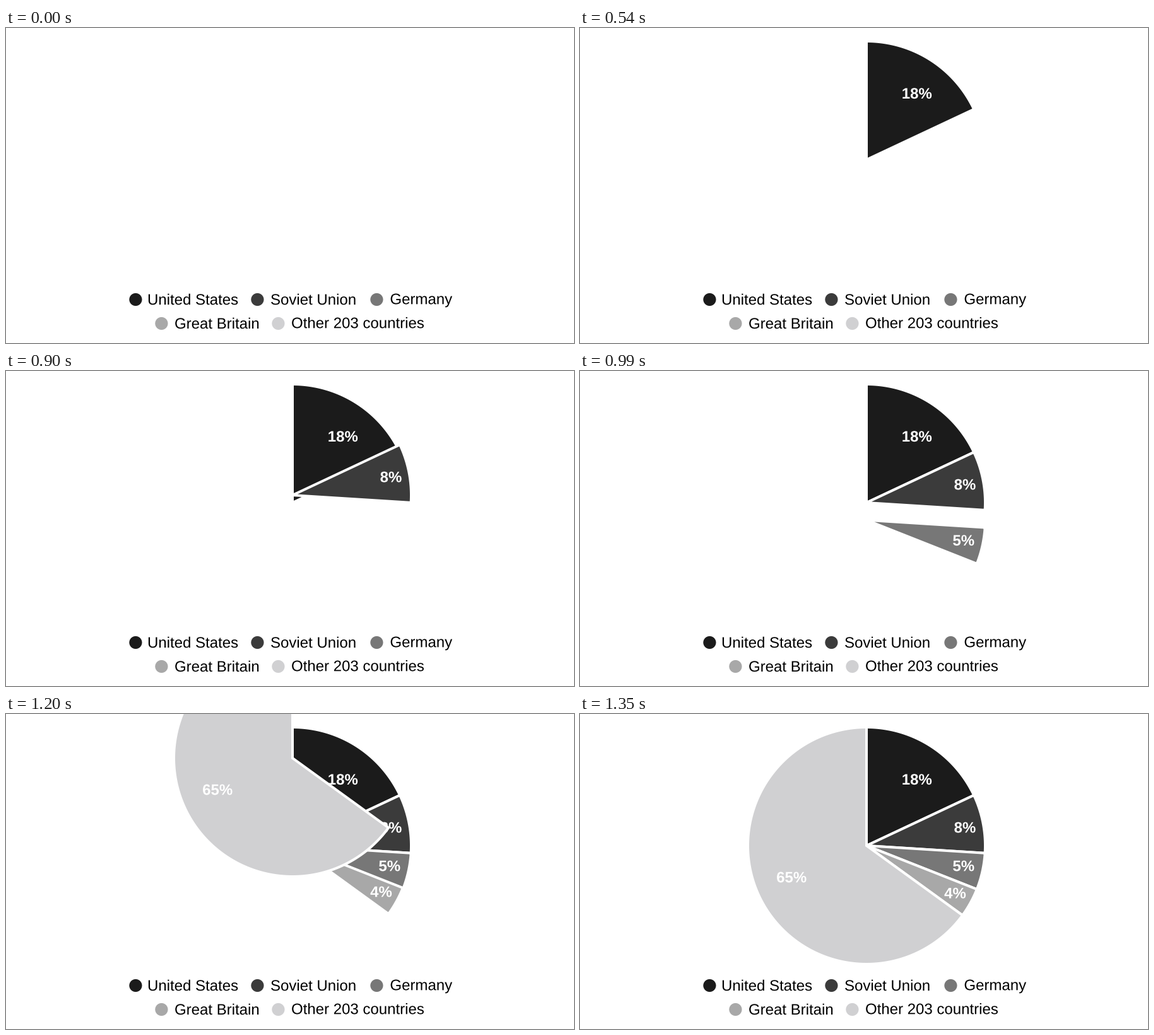
These frames come from a looping animation (900 by 500 pixels, 6.3 s). A matplotlib script:

```python
import numpy as np
import matplotlib.pyplot as plt
from matplotlib.animation import FuncAnimation
from matplotlib.patches import Circle, PathPatch, Polygon
from matplotlib.path import Path
from matplotlib.textpath import TextPath
from matplotlib.transforms import Affine2D

W, H, DPI = 900, 500, 100
STEP, LOOP = 30, 6300          # ms
CX, CY, R = 454, 209, 188
PT = 72 / DPI                  # points per pixel
FONT_PX = 24

# percent, colour, label centre x, label baseline y, entry time in ms
SLICES = [
    (18, "#1b1b1b", 534.2, 112, 390),
    (8, "#3b3b3b", 610, 188.3, 840),
    (5, "#777777", 607.8, 249.3, 960),
    (4, "#a8a8a8", 594.3, 292.5, 1080),
    (65, "#d0d0d2", 335.3, 267.3, 1200),
]

# name, dot x, dot y, text x, baseline y
LEGEND = [
    ("United States", 205, 431, 224, 439.1),
    ("Soviet Union", 398, 431, 419, 439.1),
    ("Germany", 587, 431, 608.4, 438.3),
    ("Great Britain", 246, 469, 267, 477.1),
    ("Other 203 countries", 431, 469, 452, 476.3),
]

fig = plt.figure(figsize=(W / DPI, H / DPI), dpi=DPI, facecolor="white")
ax = fig.add_axes([0, 0, 1, 1])
ax.set_xlim(0, W)
ax.set_ylim(H, 0)
ax.axis("off")


def add_text(text, x, y, color, weight="normal", center=False, zorder=20):
    """Text as an outline, so it can sit between whole pixels."""
    outline = TextPath((0, 0), text, size=FONT_PX,
                       prop={"family": "Liberation Sans", "weight": weight})
    if center:
        box = outline.get_extents()
        x -= (box.x0 + box.x1) / 2
    path = Path(outline.vertices * [1, -1] + [x, y], outline.codes)
    return ax.add_patch(PathPatch(path, fc=color, lw=0, zorder=zorder))


def wedge(start, end):
    """Pie slice outline; angles in percent of a turn, clockwise from the top."""
    a = np.linspace(start, end, 20 + int(3 * (end - start))) * 2 * np.pi / 100
    arc = np.column_stack([CX + R * np.sin(a), CY - R * np.cos(a)])
    return np.vstack([[CX, CY], arc])


def drop(k):
    """Vertical offset k steps after entry: fall, then a damped bounce."""
    if k == 0:
        return -139
    return 27.7 * (-0.43) ** (k - 1) if k < 5 else 0


groups = []
total = 0
for i, (share, color, x, y, start) in enumerate(SLICES):
    pie = Polygon(wedge(total, total + share), closed=True, fc=color,
                  ec="white", lw=4 * PT, joinstyle="miter", zorder=2 * i + 1)
    ax.add_patch(pie)
    total += share
    label = add_text(f"{share}%", x, y, "white", "bold", True, 2 * i + 2)
    groups.append((start // STEP, (pie, label)))

for (name, dx, dy, x, y), (_, color, *_) in zip(LEGEND, SLICES):
    ax.add_patch(Circle((dx + 0.4, dy), 10.1, fc=color, lw=0, zorder=20))
    add_text(name, x, y, "black")


def update(frame):
    for first, artists in groups:
        k = frame - first
        dy = drop(k) if k >= 0 else 0
        shift = Affine2D().translate(0, dy) + ax.transData
        for artist in artists:
            artist.set_visible(k >= 0)
            artist.set_transform(shift)
    return [a for _, artists in groups for a in artists]


anim = FuncAnimation(fig, update, frames=LOOP // STEP, interval=STEP,
                     init_func=lambda: update(0), repeat=True,
                     repeat_delay=0, blit=False)
plt.show()
```
